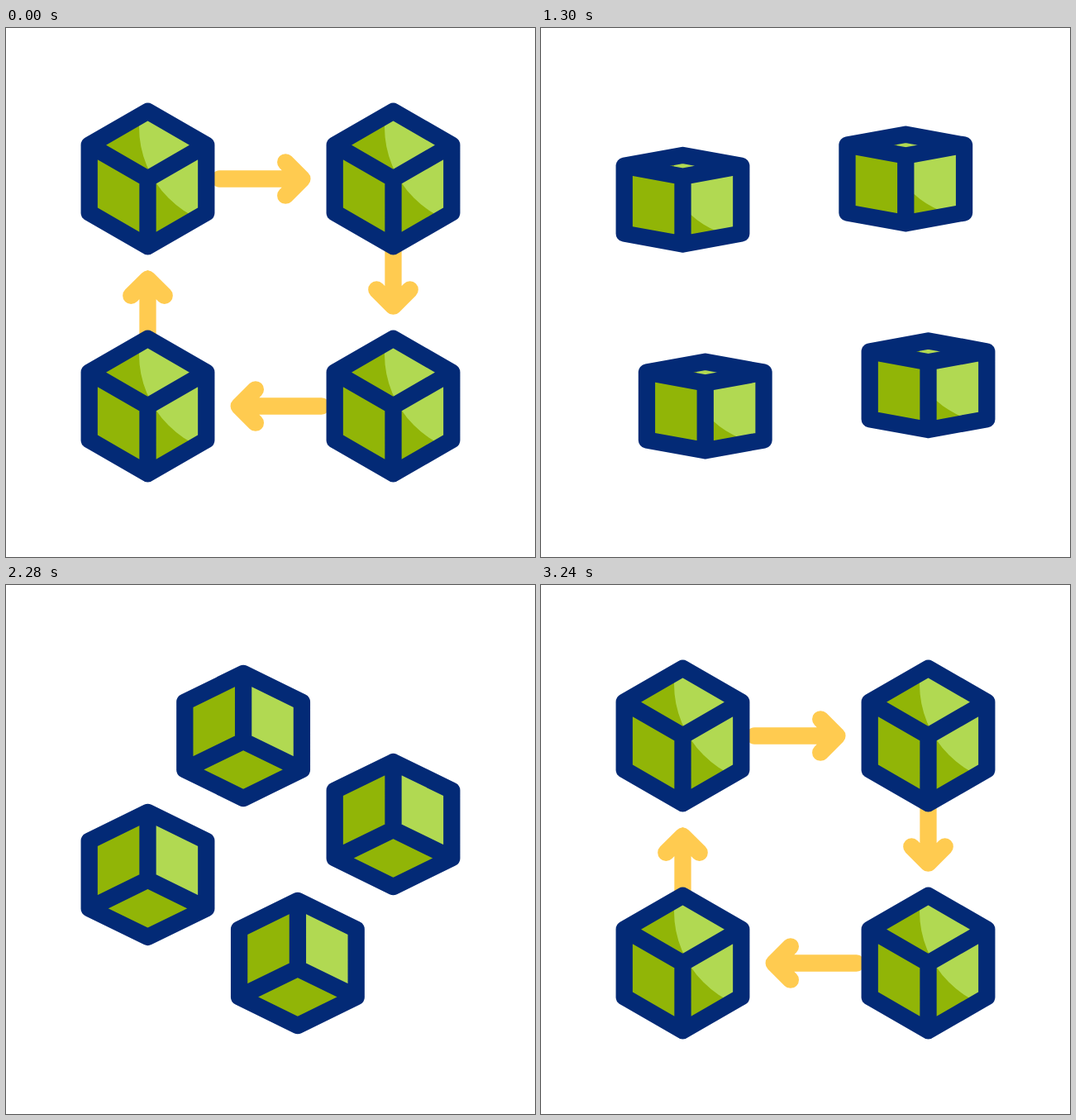
Write an HTML page that moves like this. It is 640 by 640 pixels and loops after 3600 ms.

```html
<!DOCTYPE html>
<html lang="en">
<head>
<meta charset="utf-8">
<title>Cube cycle</title>
<style>
  html, body { margin: 0; width: 100%; height: 100%; overflow: hidden; background: #fff; }
  svg { display: block; width: 100vw; height: 100vh; }
  .line { fill: none; stroke-width: 20.3; stroke-linecap: round; stroke-linejoin: round; }
</style>
</head>
<body>
<svg id="stage" viewBox="0 0 640 640"></svg>
<script>
const LOOP = 3600, MOVE = 1600, MOVES_END = 3200;
const ARROWS_OFF = 800, ARROWS_ON = 3240;
const NAVY = '#032a76', DARK = '#91b507', LIGHT = '#b1d952', YELLOW = '#ffcb50';
const W = 70.8, V = 40.9; // half width, half length of a vertical edge
const corners = [[171.5, 182.5], [468.5, 182.5], [468.5, 457.5], [171.5, 457.5]];
const stage = document.getElementById('stage');

function add(parent, tag, attrs = {}) {
  const node = document.createElementNS('http://www.w3.org/2000/svg', tag);
  for (const name in attrs) node.setAttribute(name, attrs[name]);
  return parent.appendChild(node);
}

const path = points => 'M' + points.map(p => p.join(' ')).join('L');
const smooth = u => u * u * (3 - 2 * u);

// Arrows: tip, direction in degrees, shaft length
const arrows = add(stage, 'g', { class: 'line', stroke: YELLOW });
for (const [x, y, angle, length] of [
  [358.4, 182.5, 0, 100], [468.5, 336.7, 90, 70],
  [281.7, 457.5, 180, 100], [171.5, 303.6, 270, 70]
]) {
  add(arrows, 'path', {
    d: `M${-length} 0H0M-20.2 -20.2L0 0L-20.2 20.2`,
    transform: `translate(${x} ${y}) rotate(${angle})`
  });
}

// One cube shape, shown four times
const defs = add(stage, 'defs');
const clip = add(add(defs, 'clipPath', { id: 'lit' }), 'path');
const cube = add(defs, 'g', { id: 'cube' });
const body = add(cube, 'path', { fill: DARK });
const litFaces = add(cube, 'path', { fill: LIGHT });
const shade = add(cube, 'path', { fill: DARK, 'clip-path': 'url(#lit)' });
const glint = add(cube, 'path', { fill: LIGHT, d: 'M30 29L50.5 41L40 36.2Z' });
const edges = add(cube, 'path', { class: 'line', stroke: NAVY });
const cubes = corners.map(() => add(stage, 'use', { href: '#cube' }));

// tilt runs from 1 (top face visible) to -1 (bottom face visible)
function shapeCube(tilt) {
  const h = V * tilt, a = Math.abs(h);
  const hull = path([[0, -V - a], [W, -V], [W, V], [0, V + a], [-W, V], [-W, -V]]) + 'Z';
  const right = path([[0, h - V], [W, -V], [W, V], [0, h + V]]) + 'Z';
  const top = tilt > 0 ? path([[0, -V - h], [W, -V], [0, h - V], [-W, -V]]) + 'Z' : '';
  const rim = y => path([[-W, y], [0, y + h], [W, y]]);
  const ry = Math.max(1, 54.7 + 66.7 * tilt), cy = -5.7 - 57.1 * tilt;

  body.setAttribute('d', hull);
  litFaces.setAttribute('d', right + top);
  clip.setAttribute('d', right + top);
  shade.setAttribute('d',
    `M-10.5 -200V${cy}A121 ${ry} 0 0 0 110.5 ${cy + ry}V200H-200V-200Z`);
  glint.setAttribute('opacity', Math.max(0, Math.min(1, (-tilt - 0.8) * 5)));
  edges.setAttribute('d', hull + rim(-V) + rim(V) + path([[0, h - V], [0, h + V]]));
}

function draw(t) {
  const u = t < MOVES_END ? (t % MOVE) / MOVE : 0;
  const p = smooth(u);
  const turn = 1 - 2 * smooth(1 - Math.abs(2 * u - 1));
  shapeCube(0.83 * turn + 0.17 * turn ** 3);
  corners.forEach(([x, y], i) => {
    const [nextX, nextY] = corners[(i + 1) % 4];
    cubes[i].setAttribute('transform',
      `translate(${x + (nextX - x) * p} ${y + (nextY - y) * p})`);
  });
  arrows.setAttribute('visibility',
    t < ARROWS_OFF || t >= ARROWS_ON ? 'visible' : 'hidden');
}

const start = performance.now();
function tick() {
  draw((performance.now() - start) % LOOP);
  requestAnimationFrame(tick);
}
tick();
</script>
</body>
</html>
```
